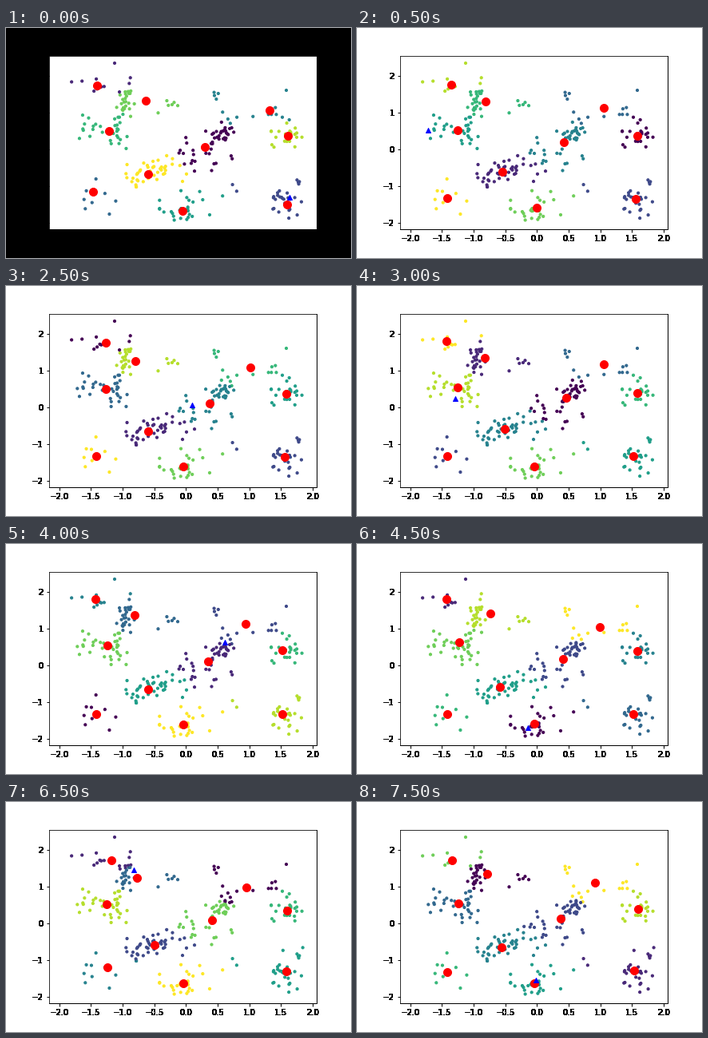
A matplotlib script for the animation above (8000 ms loop, 432 px wide and 288 px high).

```python
import numpy as np
import matplotlib.pyplot as plt
from matplotlib.animation import FuncAnimation
from matplotlib.patches import Rectangle

FRAMES, STEP = 16, 500
ORIGIN = np.array([225.3, 152.3])
UNIT = np.array([79.25, -46.0])


def to_data(px):
    return (np.asarray(px, float) - ORIGIN) / UNIT


# Sample groups in stage pixels: centre x, y, spread x, y, tilt, size
GROUPS = [
    (150, 87, 6, 13, 0.0, 30),
    (127, 130, 20, 11, 0.0, 36),
    (271, 131, 11, 9, -0.6, 34),
    (224, 160, 20, 12, 0.0, 20),
    (175, 180, 13, 9, -0.4, 36),
    (217, 229, 13, 7, 0.0, 24),
    (353, 134, 11, 8, 0.0, 22),
    (350, 221, 12, 9, 0.0, 24),
    (105, 74, 18, 8, 0.0, 8),
    (205, 93, 13, 7, 0.0, 6),
    (266, 92, 9, 13, 0.7, 6),
    (335, 105, 14, 11, 0.4, 8),
    (105, 207, 18, 13, 0.5, 9),
    (248, 213, 27, 11, 0.0, 9),
    (345, 185, 14, 11, 0.3, 7),
    (250, 170, 22, 11, 0.0, 8),
    (136, 44, 0, 0, 0.0, 1),
    (351, 78, 0, 0, 0.0, 1),
]

# Starting cluster centres in label order
HOMES = to_data([
    (249, 149), (114, 72), (352, 221), (109, 205), (330, 103),
    (221, 229), (129, 129), (175, 91), (353, 135), (178, 183),
])


def make_samples():
    rng = np.random.default_rng(12)
    parts = []
    for cx, cy, sx, sy, tilt, n in GROUPS:
        u, v = np.clip(rng.normal(size=(2, n)), -1.9, 1.9)
        v = tilt * u + np.sqrt(1 - tilt**2) * v
        parts.append(np.column_stack([cx + sx * u, cy + sy * v]))
    return to_data(rng.permutation(np.vstack(parts)))


def nearest(pts, centres):
    gap = pts[:, None] - centres[None]
    return (gap**2).sum(axis=2).argmin(axis=1)


def solve(i, pts):
    """Disturb the centres, take one k-means step and shuffle the labels."""
    if i == 0:
        return HOMES
    rng = np.random.default_rng(i)
    start = HOMES + rng.normal(0, 0.12, HOMES.shape)
    labels = nearest(pts, start)
    means = [pts[labels == k].mean(axis=0) if (labels == k).any() else c
             for k, c in enumerate(start)]
    return rng.permutation(np.array(means))


def harden(image, dpi):
    """Make every touched pixel opaque, for crisp text."""
    out = image.copy()
    out[..., 3] = out[..., 3] > 0
    return out, 0, 0


SAMPLES = make_samples()

plt.rcParams.update({"font.family": "DejaVu Sans", "font.size": 10})
fig = plt.figure(figsize=(6, 4), dpi=72)
backdrop = fig.add_artist(Rectangle((0, 0), 1, 1, transform=fig.transFigure,
                                    color="black", zorder=-1))
ax = fig.add_axes([0.125, 0.125, 0.775, 0.755])
ax.set_xlim(to_data((54, 0))[0], to_data((388.8, 0))[0])
ax.set_ylim(to_data((0, 252))[1], to_data((0, 34.56))[1])
ax.set_xticks(np.arange(-2, 2.1, 0.5))
ax.set_yticks(range(-2, 3))
ax.tick_params(width=1)
for side in ("right", "bottom"):
    ax.spines[side].set_linewidth(1)
for label in ax.get_xticklabels() + ax.get_yticklabels():
    label.set_agg_filter(harden)

dots = ax.scatter([], [], s=10, c=[], cmap="viridis", vmin=0, vmax=9, zorder=2)
means = ax.scatter([], [], s=100, c="red", zorder=3)
newest = ax.scatter([], [], s=36, c="blue", marker="^", zorder=4)


def draw(i):
    backdrop.set_color("black" if i == 0 else "white")
    known = len(SAMPLES) - FRAMES + i
    pts = SAMPLES[:known]
    centres = solve(i, pts)
    dots.set_offsets(pts)
    dots.set_array(nearest(pts, centres).astype(float))
    means.set_offsets(centres)
    newest.set_offsets(SAMPLES[known:known + 1])
    return backdrop, dots, means, newest


anim = FuncAnimation(fig, draw, frames=FRAMES, interval=STEP,
                     repeat=True, repeat_delay=0, blit=False)
plt.show()
```
